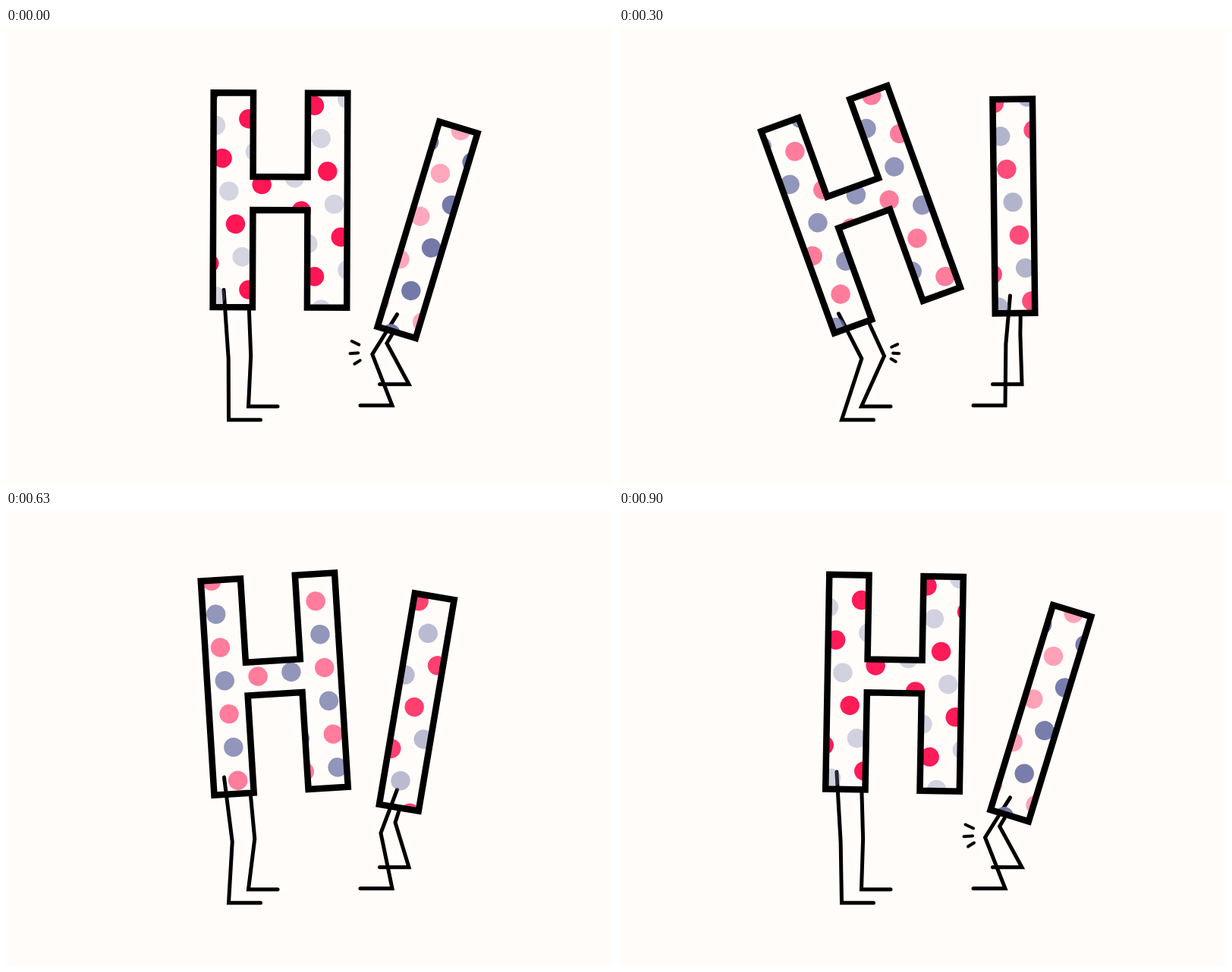
An HTML page for the animation above (930 ms loop, 800 by 600 pixels).

```html
<!DOCTYPE html>
<html lang="en">
<head>
<meta charset="utf-8">
<title>Hi</title>
<style>
  html, body { margin: 0; width: 100%; height: 100%; overflow: hidden; background: #fffcf9; }
  svg { display: block; width: 800px; height: 600px; }
  .leg, .spark { fill: none; stroke: #000; stroke-linecap: round; stroke-miterlimit: 10; }
  .leg { stroke-width: 5; }
  .spark { stroke-width: 4; }
  .fill { fill: #fffcf9; }
  .edge { fill: none; stroke: #000; stroke-width: 8.5; }
  .red { fill: #ff1654; }
  .slate { fill: #7378a8; }
</style>
</head>
<body>
<svg id="stage" viewBox="0 0 800 600"></svg>
<script>
const LOOP = 930, STEP = 30, GAP = 44.2, TILT = -11.1;
const stage = document.getElementById('stage');

function add(parent, tag, attrs = {}) {
  const el = document.createElementNS('http://www.w3.org/2000/svg', tag);
  for (const k in attrs) el.setAttribute(k, attrs[k]);
  return parent.appendChild(el);
}

const wrap = t => ((t % LOOP) + LOOP) % LOOP;
const clamp = u => Math.min(1, Math.max(0, u));
const mix = (a, b, u) => a + (b - a) * u;
const easeInOut = (u, n) => u < .5 ? .5 * (2 * u) ** n : 1 - .5 * (2 - 2 * u) ** n;

// 0 -> 1 -> 0 over the loop; rise and fall are [start, length, power]
function swing(t, rise, fall) {
  const ramp = (x, [start, len, n]) => easeInOut(clamp((x - start) / len), n);
  const x = t > LOOP + rise[0] ? t - LOOP : t;
  return ramp(x, rise) - ramp(x, fall);
}

// soft triangle wave for the dot shades
function shade(t) {
  const p = wrap(t) / LOOP;
  return (1 - Math.abs(1 - 2 * p) + (1 - Math.cos(2 * Math.PI * p)) / 2) / 2;
}

const letters = [
  {
    outline: 'M272.7 85.6H325V196.3H397V85.6H449.3V368.4H397V240.2H325V368.4H272.7Z',
    lean: t => mix(-1.3, 20.1, swing(t, [-61, 385, 2], [376, 413, 3])),
    body: q => `translate(0 ${1.26 * q}) rotate(${-q} 303 341)`,
    dots: q => `translate(0 ${1.26 * q}) rotate(${q} 232 134) translate(302 259) rotate(${TILT})`,
    shade: t => shade(t),
    back: q => [319.4 + .22 * q, 345 + 1.58 * q, 323 + 1.33 * q, 432.5, 319.5, 499, 358, 499],
    front: q => [287 + .125 * q, 345.5 + 1.57 * q, 293.5 + 1.32 * q, 436, 293.5, 516.7, 335.5, 516.7],
    sparkAt: 0,
    sparks: [[358.3, 421.1, 375.9, 413.1], [360.2, 428.6, 378, 429.8], [357.9, 435.9, 371.5, 443.9]]
  },
  {
    outline: 'M495.5 94.8H548V377.1H495.5Z',
    lean: t => mix(17, -1.05, swing(t, [-64, 440, 3], [376, 478, 3])),
    body: q => `translate(0 ${1.403 * q}) rotate(${q} 515.5 354.05)`,
    dots: q => `translate(${528.1 + 1.05 * q} ${272.1 - 1.42 * q}) rotate(${TILT - .51 * q})`,
    shade: t => 1 - shade(t - 15),
    back: q => [529.5 - .3 * q, 354 + 1.41 * q, 527.8 - 1.545 * q, 404 + .7 * q, 531, 469.7, 492.5, 469.7],
    front: q => [515.5, 354 + 1.41 * q, 508.8 - 1.55 * q, 417.2 + .78 * q, 509, 497.8, 467, 497.8],
    sparkAt: 480,
    sparks: [[471.5, 420.6, 454.7, 412.6], [471, 428.2, 452.5, 429.3], [471.4, 435.4, 458.6, 443.4]]
  }
];

function build(l, i) {
  const clip = add(stage, 'clipPath', { id: 'clip' + i });
  const shape = { d: l.outline };
  l.backEl = add(stage, 'polyline', { class: 'leg' });
  l.bodyEls = [add(clip, 'path', shape), add(stage, 'path', { ...shape, class: 'fill' })];
  l.frontEl = add(stage, 'polyline', { class: 'leg' });
  l.dotsEl = add(add(stage, 'g', { 'clip-path': `url(#clip${i})` }), 'g');
  l.red = add(l.dotsEl, 'g', { class: 'red' });
  l.slate = add(l.dotsEl, 'g', { class: 'slate' });
  for (let a = -8; a <= 8; a++)
    for (let b = -8; b <= 8; b++)
      add((a + b) % 2 ? l.slate : l.red, 'circle', { cx: a * GAP, cy: b * GAP, r: 12.7 });
  l.bodyEls.push(add(stage, 'path', { ...shape, class: 'edge' }));
  l.sparkEls = l.sparks.map(() => add(stage, 'line', { class: 'spark' }));
}

function drawSparks(l, t) {
  const x = wrap(t - l.sparkAt);
  const head = 1 - (1 - clamp((x - 206) / 320)) ** 2;
  const tail = clamp((x - 68) / 490) ** 4;
  l.sparks.forEach(([x1, y1, x2, y2], i) => {
    const el = l.sparkEls[i];
    el.setAttribute('visibility', head - tail > .02 ? 'visible' : 'hidden');
    el.setAttribute('x1', mix(x1, x2, tail));
    el.setAttribute('y1', mix(y1, y2, tail));
    el.setAttribute('x2', mix(x1, x2, head));
    el.setAttribute('y2', mix(y1, y2, head));
  });
}

function draw(t) {
  for (const l of letters) {
    const q = l.lean(t), k = l.shade(t);
    l.bodyEls.forEach(el => el.setAttribute('transform', l.body(q)));
    l.dotsEl.setAttribute('transform', l.dots(q));
    l.red.setAttribute('opacity', mix(1, .35, k));
    l.slate.setAttribute('opacity', mix(.3, 1, k));
    l.backEl.setAttribute('points', l.back(q).join(' '));
    l.frontEl.setAttribute('points', l.front(q).join(' '));
    drawSparks(l, t);
  }
}

letters.forEach(build);
const begin = performance.now();
function tick() {
  const t = wrap(performance.now() - begin);
  draw(Math.floor(t / STEP) * STEP);
  requestAnimationFrame(tick);
}
tick();
</script>
</body>
</html>
```
